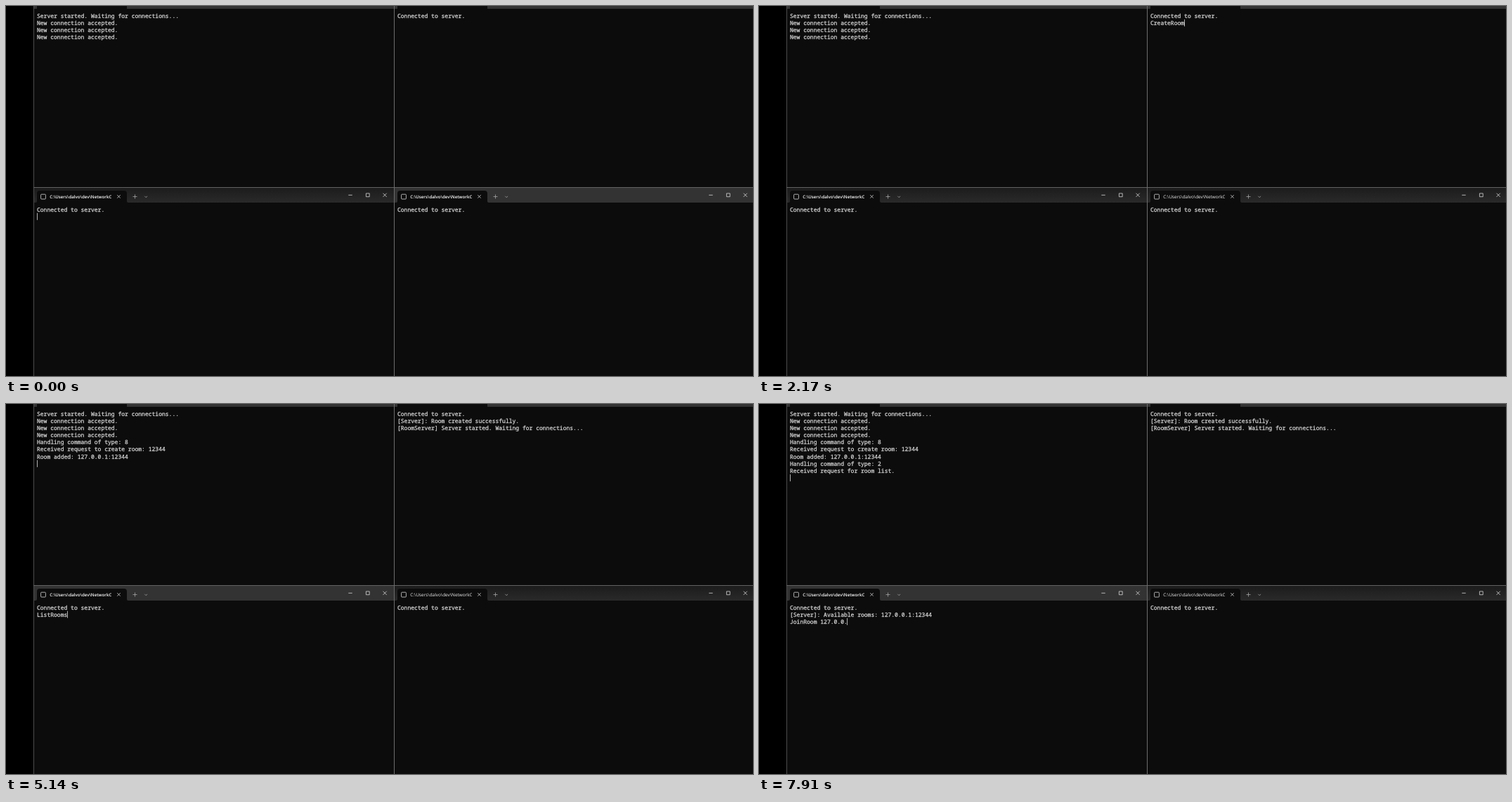
An HTML page for the animation above (8 s loop, 1063x527 px).

```html
<!DOCTYPE html>
<html lang="en">
<head>
<meta charset="utf-8">
<title>Four terminals</title>
<style>
html, body { margin: 0; width: 100%; height: 100%; overflow: hidden; background: #000; }
svg { display: block; width: 1063px; height: 527px; }
text { text-rendering: geometricPrecision; white-space: pre; }
.mono { font: 500 8.025px "Noto Sans Mono", "DejaVu Sans Mono", monospace; fill: #d4d4d4; stroke: #d4d4d4; stroke-width: .28; }
.tab { font: 600 6.15px "Open Sans", "Noto Sans", sans-serif; fill: #fff; }
.tab.idle { font-weight: 400; font-size: 6.4px; fill: #eee; }
.icon { fill: none; stroke: #d8d8d8; stroke-width: .8; }
.dim { stroke: #a4a4a4; }
</style>
</head>
<body>
<svg id="stage" viewBox="0 0 1063 527">
  <defs>
    <linearGradient id="idle" x2="0" y2="1">
      <stop offset="0" stop-color="#1c1c1c"/>
      <stop offset="1" stop-color="#2a2a2a"/>
    </linearGradient>
    <clipPath id="title"><rect x="60" y="262" width="90" height="18"/></clipPath>
  </defs>
</svg>
<script>
const LOOP = 8000, CHAR = 4.815, ROW = 10.13, DX = 513, DY = 275.7;
const BLINK = 500, KEY = 72;
const CREATED = 3180, REFOCUS = 3640;
const stage = document.getElementById('stage');

function add(tag, attrs, parent = stage, content) {
  const el = document.createElementNS('http://www.w3.org/2000/svg', tag);
  for (const key in attrs) el.setAttribute(key, attrs[key]);
  if (content) el.textContent = content;
  parent.appendChild(el);
  return el;
}
const rect = (x, y, width, height, fill, parent) => add('rect', { x, y, width, height, fill }, parent);
const icon = (d, parent, dim = '') => add('path', { d, class: 'icon ' + dim }, parent);
const show = (el, on) => el.setAttribute('visibility', on ? 'visible' : 'hidden');

// Window backgrounds and the strips of the upper title bars
rect(39, 0, 1024, 527, '#0c0c0c');
for (const x of [0, DX]) {
  rect(40 + x, 0, 512, 4, '#333');
  rect(44 + x, 0, 128, 4, '#0c0c0c');
}

function titleBar(dx) {
  const g = add('g', { transform: `translate(${dx} 0)` });
  const bar = rect(40, 259, 512, 21, '#333', g);
  add('path', { d: 'M42 280q2 0 2-2V267q0-4 4-4H168q4 0 4 4v11q0 2 2 2z', fill: '#0c0c0c' }, g);
  add('rect', { x: 49.6, y: 268.2, width: 6.8, height: 6.8, rx: 1, class: 'icon' }, g);
  const clip = add('g', { 'clip-path': 'url(#title)' }, g);
  const label = add('text', { x: 62.3, y: 274, class: 'tab' }, clip, 'C:\\Users\\dalvo\\dev\\NetworkC');
  icon('M158.3 269.2l4.4 4.4m0-4.4l-4.4 4.4', g);
  icon('M180.5 271.5h6m-3-3v6', g, 'dim');
  icon('M197.3 270.8l1.9 1.9l1.9-1.9', g, 'dim');
  icon('M487.3 269.3h5.4', g);
  icon('M512.4 266.9h4.8v4.8h-4.8z', g);
  icon('M536.5 266.7l5.2 5.2m0-5.2l-5.2 5.2', g);
  return { bar, label };
}
const leftBar = titleBar(0), rightBar = titleBar(DX);

rect(39, 0, 1, 527, '#4c4c4c');
rect(39, 258, 1024, 1, '#626262');
rect(552, 0, 1, 527, '#6c6c6c');

const scroll = add('g', {});
rect(544, 8, 7, 249, '#111', scroll);
add('path', { d: 'M545.5 12l2-2.5l2 2.5zM545.5 251l2 2.5l2-2.5z', fill: '#2a2a2a' }, scroll);

// Events are [time, row, text]. Each one restarts the caret's blinking,
// which lasts from..to; afterwards the caret rests on or off.
class Terminal {
  constructor(x, y, events, { from = 0, to = LOOP, rest = false }) {
    Object.assign(this, { x, y, events, from, to, rest, rows: [] });
    const count = Math.max(...events.map(e => e[1])) + 1;
    for (let i = 0; i < count; i++)
      this.rows.push(add('text', { x, y: y + 16.8 + i * ROW, class: 'mono' }));
    this.caret = add('rect', { width: 1, height: 10, fill: '#b0b0b0' });
  }
  draw(t) {
    const lines = this.rows.map(() => '');
    let since, last;
    for (const [time, row, text] of this.events)
      if (time <= t) { lines[row] = text; last = row; since = time; }
    lines.forEach((s, i) => {
      if (this.rows[i].textContent !== s) this.rows[i].textContent = s;
    });
    this.caret.setAttribute('x', Math.floor(this.x + lines[last].length * CHAR));
    this.caret.setAttribute('y', this.y + 9 + last * ROW);
    const lit = Math.floor((t - since) / BLINK) % 2 === 0;
    show(this.caret, t >= this.from && (t < this.to ? lit : this.rest));
  }
}

const block = (time, row, ...lines) => lines.map((s, i) => [time, row + i, s]);

// Each burst [start, word] is typed at an even pace.
function typed(row, ...bursts) {
  let text = '';
  return bursts.flatMap(([start, word]) =>
    [...word].map((c, i) => [start + i * KEY, row, text += c]));
}

const hello = 'Connected to server.', accepted = 'New connection accepted.';

const terminals = [
  new Terminal(44, 0, [
    ...block(-BLINK, 0, 'Server started. Waiting for connections...', accepted, accepted, accepted, ''),
    ...block(CREATED, 4, 'Handling command of type: 8', 'Received request to create room: 12344',
      'Room added: 127.0.0.1:12344', ''),
    ...block(5180, 7, 'Handling command of type: 2', 'Received request for room list.', '')
  ], { to: CREATED, rest: true }),

  new Terminal(44 + DX, 0, [
    ...block(0, 0, hello),
    [920, 1, ''],
    ...typed(1, [1280, 'C'], [1420, 'reate'], [1870, 'Room'], [2310, ' '], [2680, '12344']),
    ...block(CREATED, 1, '[Server]: Room created successfully.',
      '[RoomServer] Server started. Waiting for connections...', '')
  ], { from: 920, to: REFOCUS }),

  new Terminal(44, DY, [
    ...block(0, 0, hello, ''),
    [440, 1, ''],
    [REFOCUS, 1, ''],
    ...typed(1, [4470, 'List'], [4850, 'Rooms']),
    ...block(5180, 1, '[Server]: Available rooms: 127.0.0.1:12344', ''),
    ...typed(2, [5820, 'J'], [5960, 'oin'], [6270, 'Room'], [6760, ' 127'], [7330, '.0.0'], [7910, '.'])
  ], {}),

  new Terminal(44 + DX, DY, block(0, 0, hello), { to: 0 })
];

// Mouse pointer with its highlight; typing hides it
const pointer = add('g', {});
add('circle', { r: 6.5, fill: '#82820c' }, pointer);
add('path', { d: 'M0 .5v8.3l1.9-1.7l1.3 2.7l1.3-.6l-1.3-2.6h2.7z', fill: '#fff', stroke: '#222', 'stroke-width': .4 }, pointer);

const trips = [
  { start: 100, stop: 650, hide: 1160, a: [760, 535], b: [648, 118] },
  { start: 3380, stop: 3890, hide: 4410, a: [648, 118], b: [297.5, 373] }
];

function place({ start, stop, a, b }, t) {
  const k = Math.min(1, (t - start) / (stop - start));
  const ease = k * k * (3 - 2 * k);
  return a.map((v, i) => v + (b[i] - v) * ease);
}

function focus({ bar, label }, active, bold) {
  bar.setAttribute('fill', active ? '#333' : 'url(#idle)');
  label.setAttribute('class', bold ? 'tab' : 'tab idle');
}

function draw() {
  const t = performance.now() % LOOP;
  terminals.forEach(term => term.draw(t));
  focus(leftBar, t >= REFOCUS, true);
  focus(rightBar, t < 890, t < 890);
  show(scroll, t >= 400 && t < 920);
  const trip = trips.find(p => t >= p.start && t < p.hide);
  show(pointer, trip);
  if (trip) pointer.setAttribute('transform', `translate(${place(trip, t)})`);
  requestAnimationFrame(draw);
}
draw();
</script>
</body>
</html>
```
